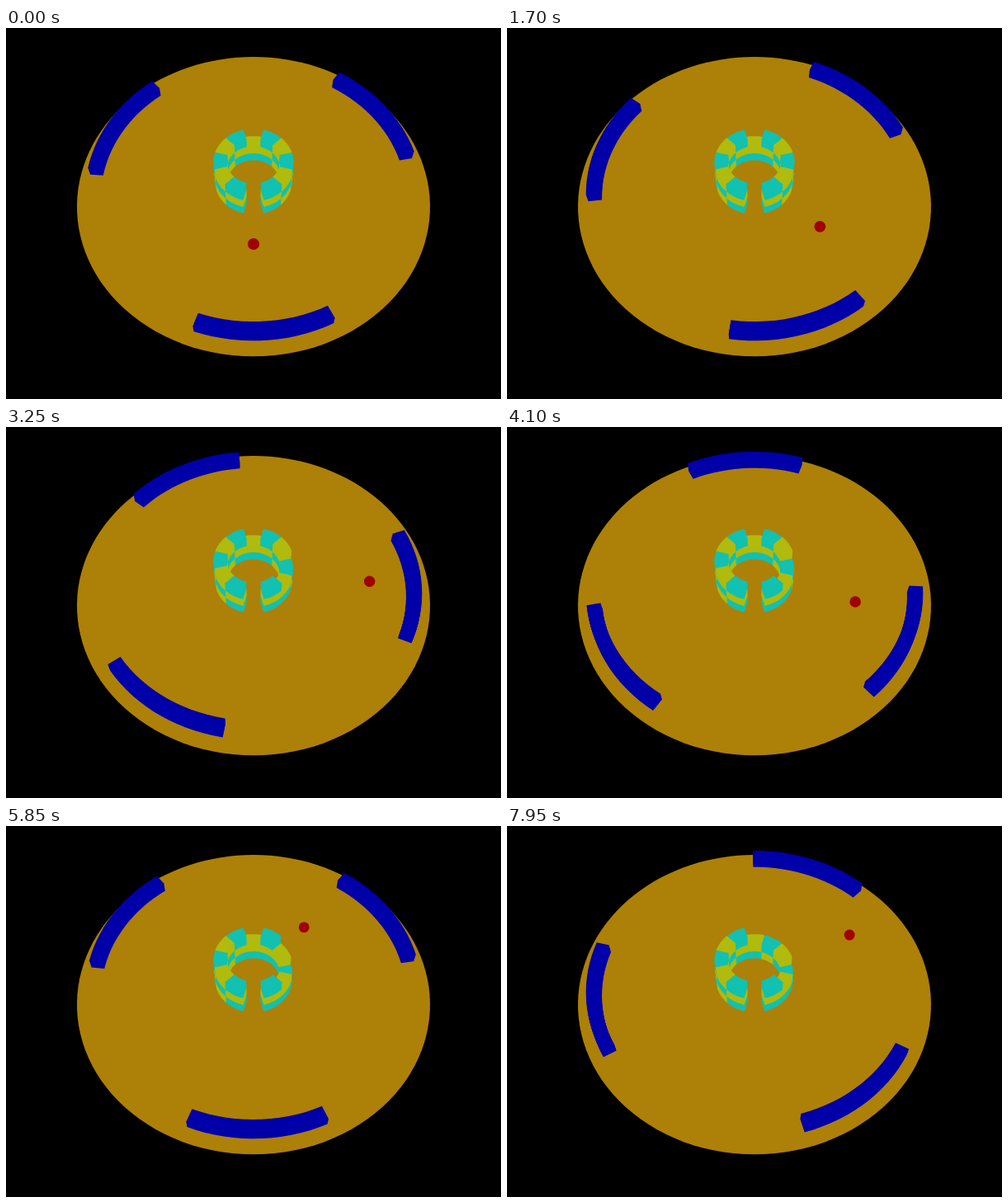
These frames come from a looping animation (600x450 px, 8000 ms). An HTML page with a canvas:

```html
<!DOCTYPE html>
<html lang="en">
<head>
<meta charset="utf-8">
<title>Round arena</title>
<style>
  html, body { margin: 0; width: 100%; height: 100%; overflow: hidden; background: #000; }
  canvas { display: block; }
</style>
</head>
<body>
<canvas id="stage" width="600" height="450"></canvas>
<script>
const ctx = document.getElementById("stage").getContext("2d");
const LOOP = 8000, STEP = 50;
const COLORS = { floor: "#ad8008", paddle: "#0000a8", ball: "#a00000", bricks: ["#b0bb0d", "#12c1b1"] };
const CAMERA = { focal: 904, distance: 4.255, lift: 0.1417, sin: 0.8598, cos: 0.5106 };
const PADDLE = { inner: 0.858, outer: 0.934, bottom: 0.045, top: 0.11, half: 22.4, sway: 12 };
const TOWER = { inner: 0.145, outer: 0.215, bottom: 0.075, layer: 0.068, layers: 3, columns: 12 };
const BALL = { z: 0.09, radius: 0.031, near: 0.245, far: 0.845 };

// Angles are in degrees, from the front edge towards the right.
// A bounce is one trip of the ball from the tower to the rim and back.
const KEYS = [
  { time: 0,    paddle: 3.5,   ball: 0,     bounces: 0.865 },
  { time: 1150, paddle: 23.8,  ball: 11.5,  bounces: 2.198 },
  { time: 2450, paddle: -11.3, ball: 101.6, bounces: 3.663 },
  { time: 4100, paddle: -56.2, ball: 74.9,  bounces: 5.726 },
  { time: 5850, paddle: 1.3,   ball: 140.2, bounces: 7.82 },
  { time: 7000, paddle: 11.5,  ball: 147.4, bounces: 9.17 },
  { time: 7950, paddle: 38.1,  ball: 118.5, bounces: 10.319 }
];
// Each hit takes the lowest brick out of a column, and the rest drops.
const HITS = [
  { bounce: 3, column: 2 }, { bounce: 4, column: 3 }, { bounce: 6, column: 3 },
  { bounce: 7, column: 4 }, { bounce: 10, column: 5 }
];

function stateAt(t) {
  const next = Math.max(1, KEYS.findIndex(key => key.time >= t));
  const a = KEYS[next - 1], b = KEYS[next];
  const u = (t - a.time) / (b.time - a.time);
  const mix = name => a[name] + (b[name] - a[name]) * u;
  const bounces = mix("bounces");
  const reach = 1 - Math.abs(1 - 2 * (bounces % 1));
  return {
    bounces,
    paddle: mix("paddle") + PADDLE.sway * Math.sin(2 * Math.PI * u),
    ball: polar(BALL.near + (BALL.far - BALL.near) * reach, mix("ball"))
  };
}

function polar(r, degrees) {
  const a = degrees * Math.PI / 180;
  return [r * Math.sin(a), -r * Math.cos(a)];
}

function project([x, y], z) {
  const scale = CAMERA.focal / (CAMERA.distance + y * CAMERA.cos - z * CAMERA.sin);
  return [300 + x * scale, 225 - (CAMERA.lift + y * CAMERA.sin + z * CAMERA.cos) * scale, scale];
}

function sector(inner, outer, from, to, z, color) {
  const count = Math.ceil((to - from) / 3);
  const addPoint = (r, i) => {
    const [x, y] = project(polar(r, from + (to - from) * i / count), z);
    ctx.lineTo(x, y);
  };
  ctx.beginPath();
  for (let i = 0; i <= count; i++) addPoint(outer, i);
  if (inner) for (let i = count; i >= 0; i--) addPoint(inner, i);
  ctx.fillStyle = color;
  ctx.fill();
}

// Solids are stacks of thin slices, painted from the floor up.
function stack(bottom, top, drawSlice) {
  const slices = 8;
  for (let s = 0; s <= slices; s++) drawSlice(bottom + (top - bottom) * s / slices);
}

function drawPaddles(angle) {
  stack(PADDLE.bottom, PADDLE.top, z => {
    for (const turn of [0, 120, 240]) {
      const middle = angle + turn;
      sector(PADDLE.inner, PADDLE.outer, middle - PADDLE.half, middle + PADDLE.half, z, COLORS.paddle);
    }
  });
}

function drawTower(bounces) {
  const heights = Array(TOWER.columns).fill(TOWER.layers);
  heights[0] = 0;
  heights[6] = 2;
  for (const hit of HITS) if (bounces >= hit.bounce) heights[hit.column]--;
  const width = 360 / TOWER.columns;
  for (let layer = 0; layer < TOWER.layers; layer++) {
    const bottom = TOWER.bottom + TOWER.layer * layer;
    stack(bottom, bottom + TOWER.layer, z => {
      heights.forEach((height, column) => {
        if (layer >= height) return;
        const color = COLORS.bricks[(column + height - 1 - layer) % 2];
        sector(TOWER.inner, TOWER.outer, (column - 0.5) * width, (column + 0.5) * width, z, color);
      });
    });
  }
}

function drawBall(position) {
  const [x, y, scale] = project(position, BALL.z);
  ctx.beginPath();
  ctx.arc(x, y, BALL.radius * scale, 0, 2 * Math.PI);
  ctx.fillStyle = COLORS.ball;
  ctx.fill();
}

function draw(now) {
  const { bounces, paddle, ball } = stateAt(Math.floor(now % LOOP / STEP) * STEP);
  const behind = ball[1] > 0.1;
  ctx.fillStyle = "#000";
  ctx.fillRect(0, 0, 600, 450);
  sector(0, 1, 0, 360, 0, COLORS.floor);
  if (behind) drawBall(ball);
  drawTower(bounces);
  drawPaddles(paddle);
  if (!behind) drawBall(ball);
}

const start = performance.now();
function tick() {
  draw(performance.now() - start);
  requestAnimationFrame(tick);
}
tick();
</script>
</body>
</html>
```
